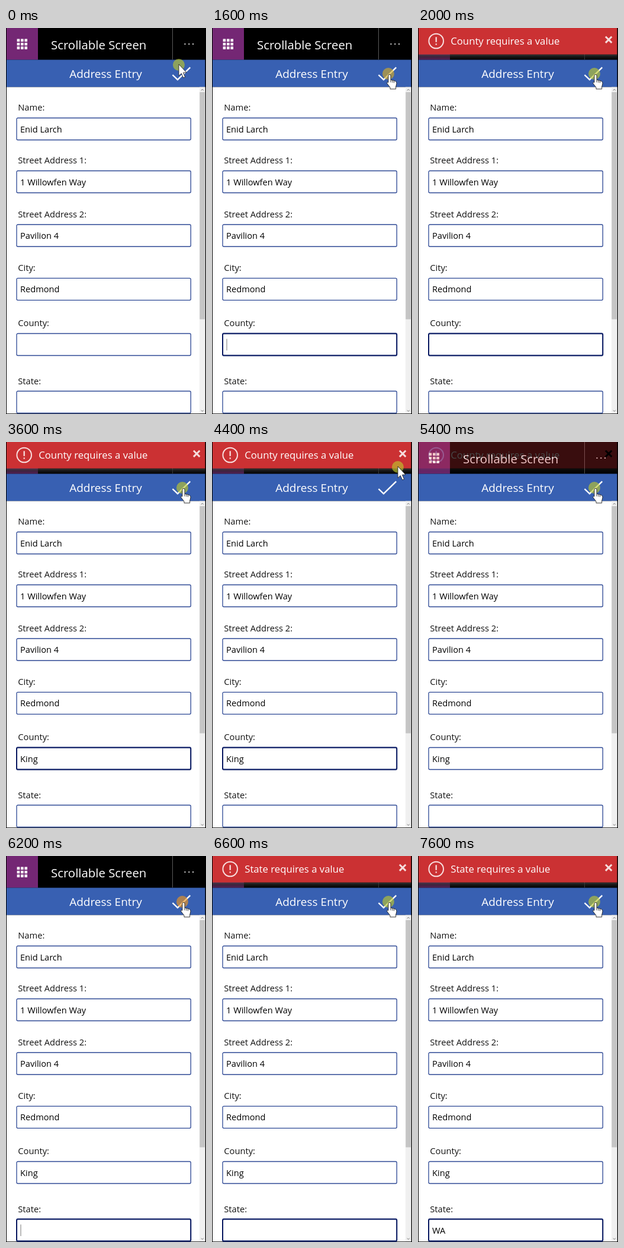
An HTML page that plays this animation: 338 px wide and 650 px high, repeating every 8 s.

```html
<!DOCTYPE html>
<html lang="en">
<head>
<meta charset="utf-8">
<title>Address Entry</title>
<style>
html, body { margin: 0; width: 100%; height: 100%; overflow: hidden; background: #000; }
svg { display: block; width: 338px; height: 650px; }
text { font-family: "Open Sans", "Noto Sans", sans-serif; white-space: pre; }
.label, .value { font-size: 14.7px; fill: #111; }
.value { font-size: 14.6px; fill: #000; }
.box { fill: #fff; stroke: #2c4794; stroke-width: 1.3; }
.focus { fill: none; stroke: #06165f; stroke-width: 2; }
.caret { fill: #777; }

/* One shared clock; 200 ms = 2.5% */
.a { animation: 8s step-end infinite; }
.pointer { animation-name: move; }
.arrow { animation-name: arrow; }
.hand { animation-name: hand; }
.spot { animation-name: click; }
.banner { animation-name: banner; }
.close { animation-name: close; }
.msg1 { animation-name: msg1; }
.msg2 { animation-name: msg2; }
.focus1 { animation-name: focus1; }
.focus2 { animation-name: focus2; }
.caret1 { animation-name: caret1; }
.caret2 { animation-name: caret2; }
.k1 { animation-name: k1; }
.k2 { animation-name: k2; }
.k3 { animation-name: k3; }
.k4 { animation-name: k4; }
.s1 { animation-name: s1; }
.s2 { animation-name: s2; }

@keyframes move {
  0% { transform: translate(292px, 62px); }
  2.5% { transform: translate(292.5px, 63.5px); }
  5% { transform: translate(294px, 67px); }
  7.5% { transform: translate(296px, 71px); }
  10% { transform: translate(297px, 74px); }
  12.5% { transform: translate(297.6px, 76px); }
  15% { transform: translate(298px, 77px); }
  50% { transform: translate(300px, 73px); }
  52.5% { transform: translate(306px, 60px); }
  55% { transform: translate(314px, 42px); }
  57.5% { transform: translate(320px, 27px); }
  60% { transform: translate(322px, 22px); }
  65% { transform: translate(312px, 46px); }
  67.5%, 100% { transform: translate(298px, 77px); }
}
@keyframes arrow {
  0%, 52.5%, 65% { opacity: 1; }
  7.5%, 57.5%, 67.5%, 100% { opacity: 0; }
}
@keyframes hand {
  0%, 52.5%, 65% { opacity: 0; }
  7.5%, 57.5%, 67.5%, 100% { opacity: 1; }
}
@keyframes click {
  0%, 22.5%, 65%, 82.5%, 100% { fill: rgb(190, 200, 45); }
  17.5%, 60%, 75% { fill: rgb(240, 150, 30); }
  20%, 80% { fill: rgb(212, 172, 38); }
}
@keyframes banner {
  0%, 72.5% { opacity: 0; }
  22.5%, 80% { opacity: .6; }
  25%, 82.5%, 100% { opacity: 1; }
  62.5% { opacity: .87; }
  65% { opacity: .6; }
  67.5% { opacity: .28; }
  70% { opacity: .06; }
}
@keyframes close {
  0%, 72.5%, 100% { stroke: #f6dcdc; }
  57.5% { stroke: #000; }
}
@keyframes msg1 { 0% { opacity: 1; } 72.5%, 100% { opacity: 0; } }
@keyframes msg2 { 0% { opacity: 0; } 72.5%, 100% { opacity: 1; } }
@keyframes focus1 { 0%, 60%, 100% { opacity: 0; } 20% { opacity: 1; } }
@keyframes focus2 { 0% { opacity: 0; } 77.5%, 100% { opacity: 1; } }
@keyframes caret1 { 0%, 25%, 37.5%, 100% { opacity: 0; } 20%, 30% { opacity: 1; } }
@keyframes caret2 { 0%, 82.5%, 92.5%, 100% { opacity: 0; } 77.5%, 90% { opacity: 1; } }
@keyframes k1 { 0% { fill-opacity: 0; } 37.5%, 100% { fill-opacity: 1; } }
@keyframes k2 { 0% { fill-opacity: 0; } 40%, 100% { fill-opacity: 1; } }
@keyframes k3 { 0% { fill-opacity: 0; } 42.5%, 100% { fill-opacity: 1; } }
@keyframes k4 { 0% { fill-opacity: 0; } 45%, 100% { fill-opacity: 1; } }
@keyframes s1 { 0% { fill-opacity: 0; } 92.5%, 100% { fill-opacity: 1; } }
@keyframes s2 { 0% { fill-opacity: 0; } 95%, 100% { fill-opacity: 1; } }
</style>
</head>
<body>
<svg viewBox="0 0 338 650" width="338" height="650">
  <defs>
    <rect id="box" x="18" width="294.3" height="37" rx="2"/>
    <rect id="dot" width="4.6" height="4.6"/>
    <g id="row">
      <use href="#dot"/><use href="#dot" x="6.4"/><use href="#dot" x="12.8"/>
    </g>
    <linearGradient id="shade" x2="0" y2="1">
      <stop offset="0" stop-color="#404040" stop-opacity=".85"/>
      <stop offset=".45" stop-color="#222" stop-opacity=".65"/>
      <stop offset="1" stop-color="#111" stop-opacity=".3"/>
    </linearGradient>
  </defs>

  <!-- Header -->
  <rect width="338" height="650"/>
  <rect x="1" width="53" height="53.5" fill="#742774"/>
  <g fill="#fff">
    <use href="#row" x="18.6" y="18.4"/>
    <use href="#row" x="18.6" y="24.8"/>
    <use href="#row" x="18.6" y="31.2"/>
    <circle cx="302.5" cy="27" r="1.1"/>
    <circle cx="309.3" cy="27" r="1.1"/>
    <circle cx="316.1" cy="27" r="1.1"/>
    <text x="76" y="36" font-size="20.4">Scrollable Screen</text>
  </g>
  <rect x="281" width="1" height="53" fill="#5a5a5a"/>

  <!-- Title bar -->
  <rect x="1" y="53.5" width="335.5" height="46" fill="#3860b2"/>
  <text x="168.5" y="84" font-size="19" fill="#fff" text-anchor="middle">Address Entry</text>
  <path d="M281.5 79L290 87.2L311.3 66.3" fill="none" stroke="#fff" stroke-width="2.4"/>

  <!-- Form -->
  <rect x="1" y="99.5" width="335.5" height="549.7" fill="#fff"/>
  <g class="label">
    <text x="20.3" y="139">Name:</text>
    <text x="20.3" y="228">Street Address 1:</text>
    <text x="20.3" y="319">Street Address 2:</text>
    <text x="20.3" y="409">City:</text>
    <text x="20.3" y="502">County:</text>
    <text x="20.3" y="599.5">State:</text>
  </g>
  <g class="box">
    <use href="#box" y="151.5"/>
    <use href="#box" y="240.5"/>
    <use href="#box" y="331"/>
    <use href="#box" y="421.3"/>
    <use href="#box" y="514.5"/>
    <use href="#box" y="611.5"/>
  </g>
  <use href="#box" y="514.5" class="focus a focus1"/>
  <use href="#box" y="611.5" class="focus a focus2"/>
  <g class="value">
    <text x="24" y="175.5">Enid Larch</text>
    <text x="24" y="264.5">1 Willowfen Way</text>
    <text x="24" y="355">Pavilion 4</text>
    <text x="24" y="445">Redmond</text>
    <text x="24" y="539"><tspan class="a k1">K</tspan><tspan class="a k2">i</tspan><tspan class="a k3">n</tspan><tspan class="a k4">g</tspan></text>
    <text x="24" y="636"><tspan class="a s1">W</tspan><tspan class="a s2">A</tspan></text>
  </g>
  <rect x="24.5" y="523.5" width="1" height="19.5" class="caret a caret1"/>
  <rect x="24.5" y="620.5" width="1" height="19.5" class="caret a caret2"/>

  <!-- Scrollbar -->
  <rect x="327" y="99.5" width="9.5" height="549.5" fill="#f0f0f0"/>
  <rect x="327.3" y="108" width="8.7" height="382.5" fill="#c5c5c5"/>
  <path d="M329.8 105.3l2-2.2 2 2.2M329.8 643.5l2 2.2 2-2.2" fill="none" stroke="#777"/>

  <!-- Error banner -->
  <g class="a banner">
    <rect x="1" y="44.5" width="335.5" height="9" fill="url(#shade)"/>
    <rect x="1" width="335.5" height="44.5" fill="#cb3133"/>
    <circle cx="30.7" cy="22" r="12.3" fill="none" stroke="#f8dede" stroke-width="2"/>
    <path d="M30.7 15.3V23.8M30.7 26.2V28.6" stroke="#f8dede" stroke-width="2.3"/>
    <g font-size="16.75" fill="#fff">
      <text x="55.2" y="28" class="a msg1">County requires a value</text>
      <text x="55.2" y="28" class="a msg2">State requires a value</text>
    </g>
    <path d="M317 14.5l10.4 10.4M327.4 14.5l-10.4 10.4" stroke-width="3" class="a close"/>
  </g>

  <!-- Pointer -->
  <g class="a pointer">
    <circle r="10" fill-opacity=".64" class="a spot"/>
    <g fill="#fff" stroke="#222" stroke-width=".9" stroke-linejoin="round">
      <path class="a arrow" d="M0-1V18.5l4.4-4 3.3 7.3 3-1.3-3.2-7.2 5.6-.3Z"/>
      <g class="a hand">
        <path transform="translate(2 1)" d="M-2 2.2a2 2 0 0 1 4 0V9.3l2 .4 2.6.6 2.6.8 1.8 1.3c.9.9 1 2 .9 3.6l-1.2 5V24.8H1V22l-4.8-6.2c-1.2-2 .4-3.4 1.8-2.1Z"/>
        <path d="M4 10.5v4M6.9 11v4M9.6 12v3.5" fill="none"/>
      </g>
    </g>
  </g>
</svg>
</body>
</html>
```
